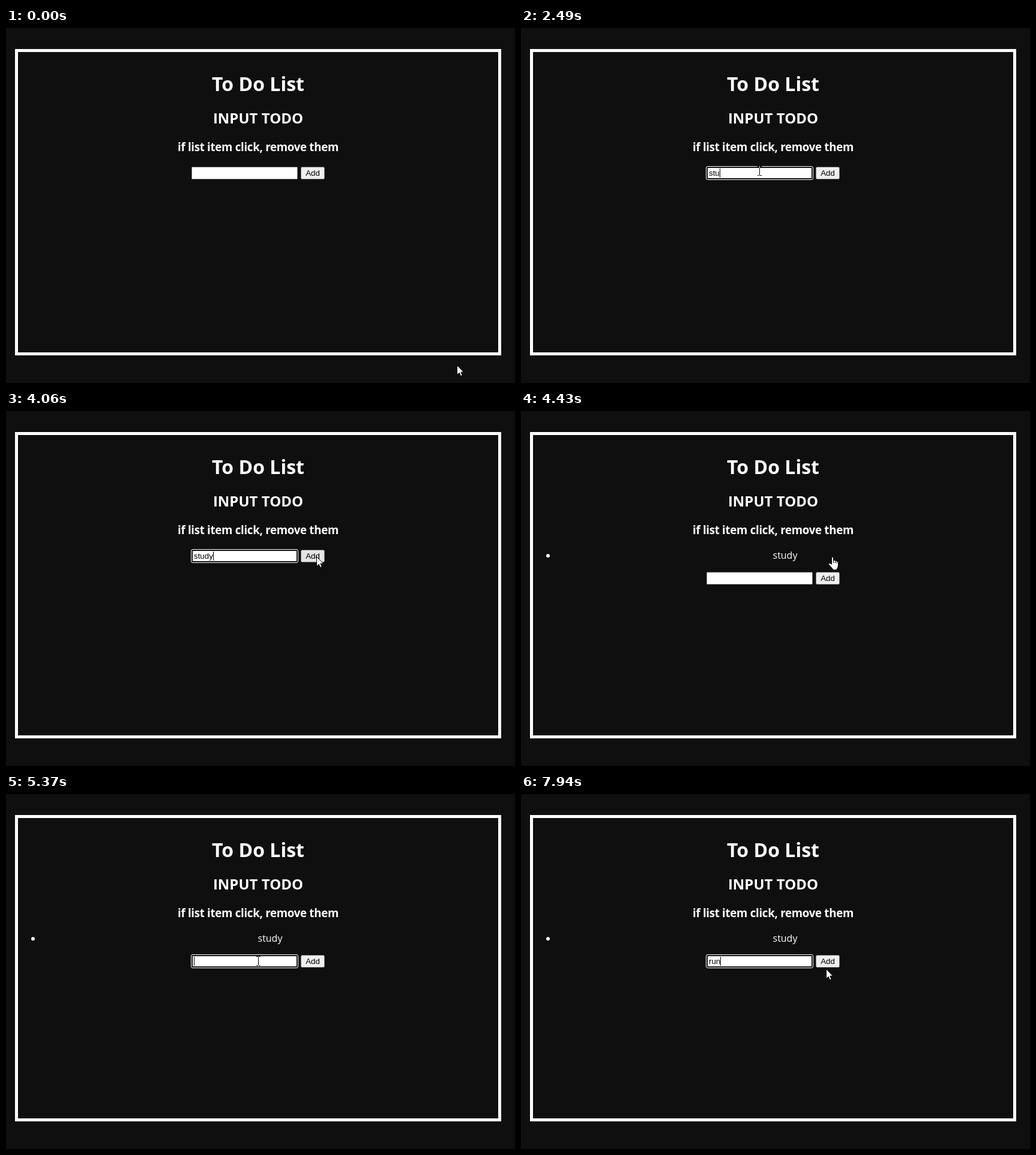
Animation, 848 px wide and 591 px high, one loop 8000 ms. Source, as an HTML page:

```html
<!DOCTYPE html>
<html lang="en">
<head>
<meta charset="utf-8">
<title>To Do List</title>
<style>
  html, body { margin: 0; width: 100%; height: 100%; overflow: hidden; background: #0f0f0f; }
  svg { display: block; }
  .page { fill: #fff; font-family: "Open Sans", "Noto Sans", sans-serif; text-anchor: middle; }
  .bold { font-weight: 700; }
  .control { fill: #000; font: 13.333px "Liberation Sans", Arial, sans-serif; }
  #beam { mix-blend-mode: difference; }
</style>
</head>
<body>
<svg width="848" height="591" viewBox="0 0 848 591">
  <rect width="848" height="591" fill="#0f0f0f"/>
  <rect x="17.5" y="37.5" width="805" height="505" fill="none" stroke="#fff" stroke-width="5"/>

  <g class="page">
    <g class="bold">
      <text x="420" y="105" font-size="32">To Do List</text>
      <text x="420" y="159" font-size="24">INPUT TODO</text>
      <text x="420" y="205" font-size="18.72" letter-spacing="-.3">if list item click, remove them</text>
    </g>
    <g id="item">
      <circle cx="45" cy="241" r="3"/>
      <text x="440" y="246" font-size="16">study</text>
    </g>
  </g>

  <g id="form">
    <rect x="309.5" y="231.5" width="176" height="20" rx="1" fill="#fff" stroke="#767676"/>
    <g id="focus">
      <rect x="308.5" y="230.5" width="178" height="22" rx="2.5" fill="#101010" stroke="#fff"/>
      <rect x="311" y="233" width="173" height="17" fill="#fff"/>
    </g>
    <text id="value" class="control" x="313" y="246"></text>
    <rect id="caret" y="234" width="1" height="15"/>
    <rect id="button" x="491.5" y="231.5" width="39" height="20" rx="2" stroke="#767676"/>
    <text class="control" x="499.2" y="246">Add</text>
  </g>

  <circle id="halo" r="12" fill="#ff0" fill-opacity=".5"/>
  <path id="beam" fill="none" stroke="#fff" d="M-3-7.5H0M1-7.5H4M.5-7V7M-3 7.5H0M1 7.5H4"/>
  <path id="arrow" fill="#fff" stroke="#000" d="M.5.5V16.5L4.2 13L6.6 18.6L9.2 17.5L6.9 12H11.7Z"/>
  <path id="hand" fill="#fff" stroke="#000" d="M.5 12V2.5a1.5 1.5 0 0 1 3 0V6.5q3-.8 3 .8q2.6-.6 2.6.9q2.4-.3 2.4 1.6V15q0 3-2 5.5q-.3 2-1.5 2H4q-1.5 0-2.5-2.5L-4 13.8q-1-2 .5-2.6q1.3-.3 4 2ZM3.5 6.5V11M6.5 7.5V11M9.1 8.5V11.5"/>
</svg>
<script>
const LOOP = 8000;
const $ = id => document.getElementById(id);

// Each track lists [start time, ...state]; a state holds until the next one.
const pointer = [
  [0, 'arrow', 751, 561], [70, 'arrow', 738, 545], [150, 'arrow', 690, 490],
  [230, 'arrow', 610, 405], [310, 'arrow', 530, 322], [390, 'arrow', 470, 262],
  [470, 'arrow', 430, 226], [550, 'arrow', 410, 219], [630, 'arrow', 402, 226],
  [710, 'beam', 399, 235], [790, 'beam', 399, 237], [1010, 'beam', 397, 238],
  [3650, 'beam', 400, 237], [3730, 'beam', 416, 233], [3810, 'beam', 448, 231],
  [3890, 'arrow', 487, 232], [3980, 'arrow', 507, 237], [4060, 'arrow', 517, 242],
  [4430, 'hand', 517, 242], [4530, 'hand', 514, 246], [4610, 'arrow', 497, 258],
  [4690, 'beam', 468, 270], [4770, 'beam', 440, 274], [4840, 'beam', 425, 275],
  [4910, 'beam', 421, 274], [5370, 'beam', 420, 278], [5450, 'beam', 419, 278],
  [7620, 'beam', 424, 280], [7700, 'beam', 446, 281], [7780, 'arrow', 478, 290],
  [7860, 'arrow', 500, 291], [7940, 'arrow', 508, 291]
];
const typed = [
  [0, ''], [1160, 's'], [2100, 'st'], [2490, 'stu'], [2790, 'stud'], [2890, 'study'],
  [4430, ''], [6460, 'r'], [6620, 'ru'], [6850, 'run']
];
const caretX = { '': 313, s: 320, st: 323, stu: 331, stud: 338, study: 345, r: 317, ru: 325, run: 332 };
const caretOn = [
  [0, false], [790, true], [1710, false], [2100, true], [3430, false], [3980, true],
  [4360, false], [5070, true], [5610, false], [6070, true], [7320, false], [7860, true]
];
const focused = [[0, false], [790, true], [4360, false], [5070, true]];
const buttonFill = [[0, '#efefef'], [3980, '#e5e5e5'], [4360, '#f5f5f5'], [4430, '#efefef']];
const halo = [
  [0, false], [790, true, 397, 236], [860, false], [4360, true, 517, 242], [4430, false],
  [5070, true, 420, 273], [5150, false]
];

const at = (track, t) => track.findLast(step => step[0] <= t).slice(1);
const show = (id, on) => $(id).setAttribute('visibility', on ? 'visible' : 'hidden');
const move = (id, x, y) => $(id).setAttribute('transform', `translate(${x} ${y})`);

function draw(now) {
  const t = now % LOOP;
  const added = t >= 4430;
  const [text] = at(typed, t);
  const [kind, x, y] = at(pointer, t);
  const [pressed, haloX = 0, haloY = 0] = at(halo, t);

  show('item', added);
  move('form', 0, added ? 37 : 0);
  show('focus', at(focused, t)[0]);
  $('value').textContent = text;
  $('caret').setAttribute('x', caretX[text]);
  show('caret', at(caretOn, t)[0]);
  $('button').setAttribute('fill', at(buttonFill, t)[0]);

  show('halo', pressed);
  move('halo', haloX, haloY);
  for (const id of ['beam', 'arrow', 'hand']) show(id, id === kind);
  move(kind, x, y);
}

const start = performance.now();
function tick() {
  draw(performance.now() - start);
  requestAnimationFrame(tick);
}
tick();
</script>
</body>
</html>
```
